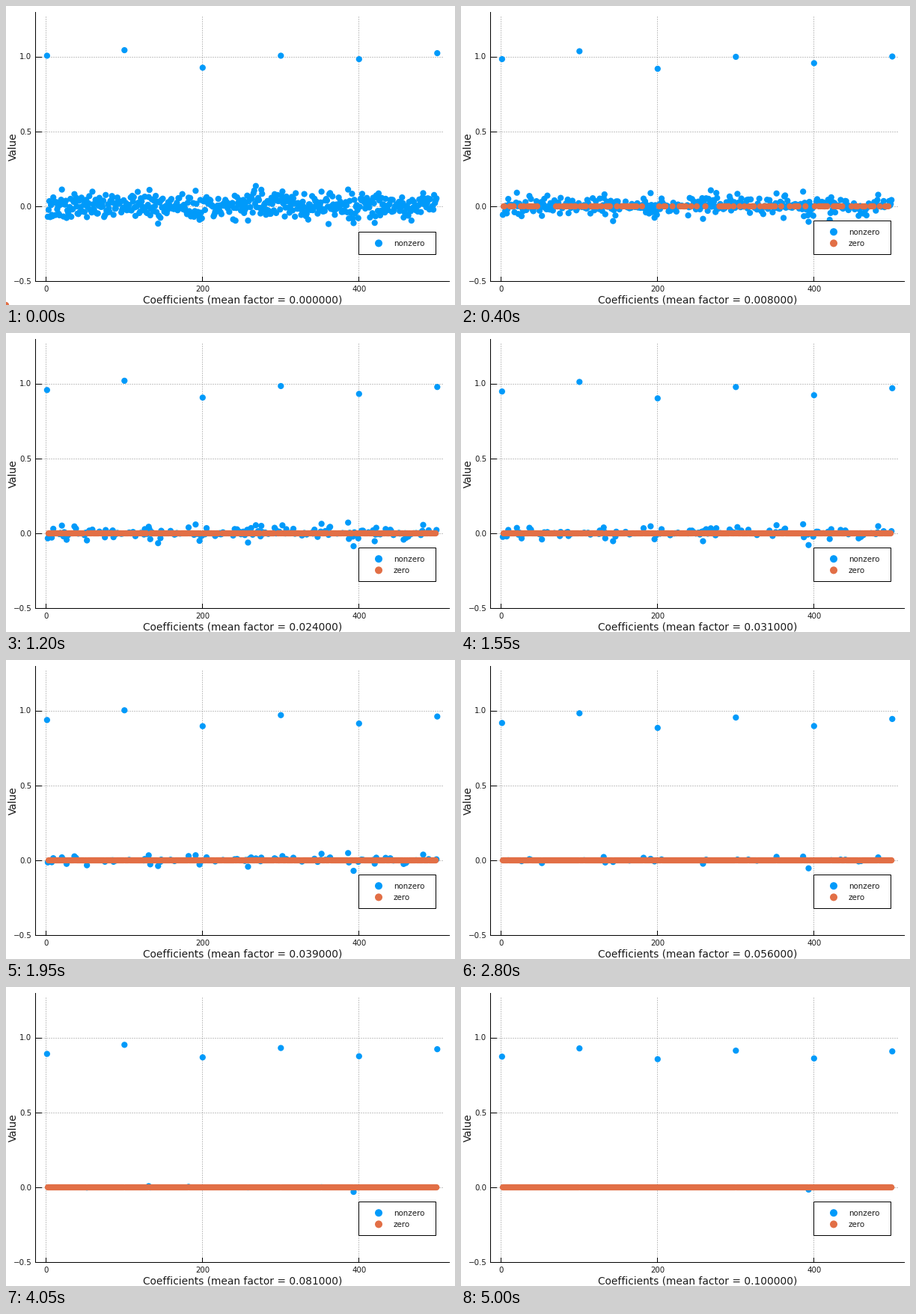
Recreate the animation shown at these times as a matplotlib script. Size 600 by 400 pixels, loop 5050 ms.

```python
import numpy as np
import matplotlib.pyplot as plt
from matplotlib.animation import FuncAnimation
from matplotlib.collections import EllipseCollection
from matplotlib.patches import Rectangle

W, H, DPI = 600, 400, 100
FRAMES, STEP_MS = 101, 50
COUNT = 500
PX = 72 / DPI                      # one pixel in points
BLUE, ORANGE = "#009afa", "#e26f46"
SMALL, LARGE = 10.2, 13.7          # text sizes in pixels

# Large coefficients: index -> start, end, easing power
SPIKES = {
    1: (1.006, 0.873, 0.7), 100: (1.043, 0.928, 1.1), 200: (0.926, 0.856, 0.9),
    300: (1.006, 0.913, 1.0), 400: (0.983, 0.861, 0.6), 500: (1.023, 0.908, 0.65),
}
# Noise that stands out: index -> start, step at which it reaches zero
STRONG = {
    20: (0.112, 52), 52: (-0.072, 84), 131: (0.062, 100), 133: (-0.060, 82),
    182: (0.058, 90), 258: (-0.095, 82), 268: (0.136, 46), 352: (0.098, 82),
    361: (-0.118, 28), 386: (0.112, 80), 393: (-0.112, 125), 482: (0.088, 80),
}


def build_paths():
    """Coefficient values, one row per step, shrinking to exact zeros."""
    rng = np.random.default_rng(12)
    steps = np.arange(FRAMES)[:, None]
    life = rng.exponential(1, COUNT)
    sign = rng.choice([-1, 1], COUNT)
    start = 0.031 * sign * np.sqrt(life) + 0.028 * rng.standard_normal(COUNT)
    last = np.minimum(22 * life ** 0.8, 66)
    for i, (value, end) in STRONG.items():
        start[i - 1], last[i - 1] = value, end
    paths = start * np.clip(1 - steps / last, 0, 1) ** 1.25
    for i, (value, end, power) in SPIKES.items():
        paths[:, i - 1] = value + (end - value) * (steps[:, 0] / 100) ** power
    return paths


def to_x(i):
    return 53.8 + 1.045 * i


def to_y(v):
    return 268 - 200.3 * v


PATHS = build_paths()
XS = to_x(np.arange(1, COUNT + 1))

fig = plt.figure(figsize=(W / DPI, H / DPI), dpi=DPI, facecolor="white")
ax = fig.add_axes([0, 0, 1, 1])
ax.set_xlim(0, W)
ax.set_ylim(H, 0)
ax.axis("off")


def line(x, y, **style):
    ax.plot(x, y, **{"color": "black", "lw": PX, "zorder": 2, **style})


def label(x, y, text, size=SMALL, **style):
    return ax.text(x, y, text, family="DejaVu Sans", fontsize=size * PX,
                   color="0.1", va="baseline", **{"zorder": 6, **style})


def dots(color, size, z):
    # one width per dot keeps them at fractions of a pixel
    widths = np.full(COUNT, size)
    art = EllipseCollection(widths, widths, np.zeros(COUNT), units="xy",
                            offsets=np.empty((0, 2)), offset_transform=ax.transData,
                            facecolors=color, linewidths=0, zorder=z)
    ax.add_collection(art, autolim=False)
    return art


# axes, ticks and dotted grid
grid = dict(zorder=1, color="0.55", dashes=(1, 2), dash_capstyle="butt")
for v in (-0.5, 0, 0.5, 1):
    y = to_y(v)
    if v > -0.5:
        line([45, 583], [y, y], **grid)
    line([39, 47], [y, y])
    label(34.3, y + 3.7, f"{v:.1f}".replace("-", "\u2212"), ha="right")
for i in (0, 200, 400):
    x = to_x(i) - 0.5
    line([x, x], [14, 364], **grid)
    line([x, x], [368, 362])
    label(x + 0.5, 381.7, str(i), ha="center")
line([39, 39], [8, 368])
line([39, 592], [368, 368])
label(13.8, 188.5, "Value", LARGE, rotation=90, rotation_mode="anchor", ha="center")
caption = label(316.5, 397.7, "", LARGE, ha="center")

nonzero = dots(BLUE, 8.2, 3)
zero = dots(ORANGE, 8.2, 4)

# legend
box = Rectangle((471, 287), 103, 45, fc="white", ec="black", lw=PX, zorder=5)
ax.add_patch(box)
key_nonzero = dots(BLUE, 10, 6)
key_zero = dots(ORANGE, 10, 6)
key_zero.set_offsets([(498, 317.4)])
name_nonzero = label(518, 306, "nonzero")
name_zero = label(518, 321, "zero")


def draw(k):
    vals = PATHS[k]
    dead = vals == 0
    spots = np.column_stack((XS, to_y(vals)))
    nonzero.set_offsets(spots[~dead])
    zero.set_offsets(spots[dead])

    both = bool(dead.any())
    row = 302.2 if both else 317.4
    box.set_y(287 if both else 302)
    box.set_height(45 if both else 30)
    key_nonzero.set_offsets([(498, row)])
    name_nonzero.set_y(row + 3.7)
    key_zero.set_visible(both)
    name_zero.set_visible(both)
    caption.set_text(f"Coefficients (mean factor = {k / 1000:.6f})")
    return nonzero, zero, box, key_nonzero, key_zero, name_nonzero, name_zero, caption


anim = FuncAnimation(fig, draw, frames=FRAMES, interval=STEP_MS,
                     init_func=lambda: draw(0), repeat=True, repeat_delay=0)
plt.show()
```
